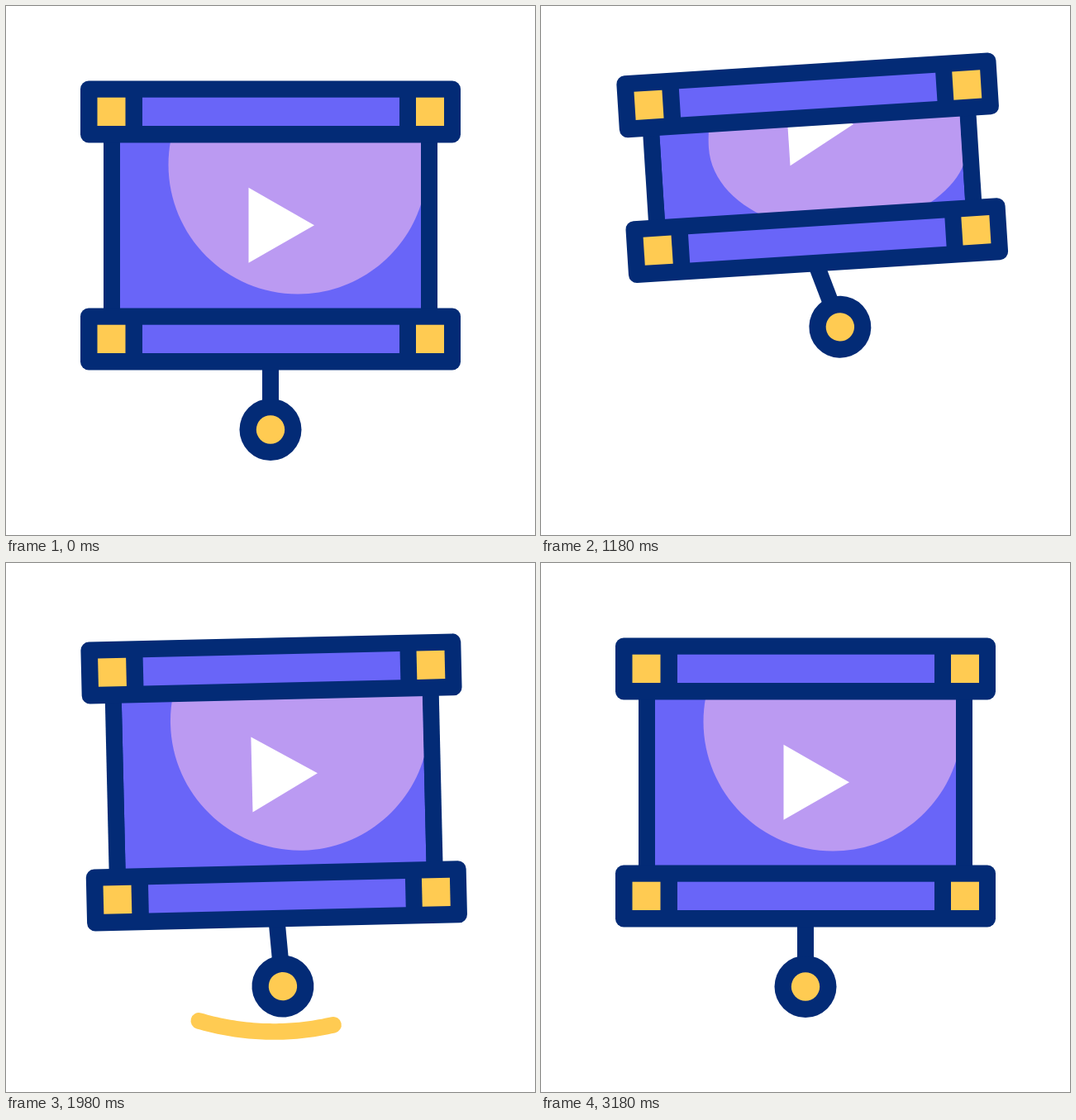
An HTML page with a canvas for the animation above (3.44 s loop, 640x640 px).

```html
<!DOCTYPE html>
<html>
<head>
<meta charset="utf-8">
<style>
html, body { margin: 0; width: 100%; height: 100%; overflow: hidden; background: #fff; }
canvas { display: block; }
</style>
</head>
<body>
<canvas id="stage" width="640" height="640"></canvas>
<script>
const ctx = document.getElementById('stage').getContext('2d');
const LOOP = 3440, REST = 275, RAD = Math.PI / 180;
const NAVY = '#032b76', VIOLET = '#6965f8', LILAC = '#bb9af2', YELLOW = '#ffcb52';

const progress = (t, from, to) => Math.min(1, Math.max(0, (t - from) / (to - from)));
const wave = (t, from, to) => (1 - Math.cos(Math.PI * progress(t, from, to))) / 2;
const easeOut = (t, from, to) => 1 - (1 - progress(t, from, to)) ** 2;
const hump = (t, from, peak, to) => wave(t, from, peak) - wave(t, peak, to);

function snap(t, from, to) {
  const p = progress(t, from, to);
  return p < 0.5 ? 4 * p ** 3 : 1 - 4 * (1 - p) ** 3;
}

// Swings from 0 at `start` to each [time, value] in turn.
function sway(t, start, ...turns) {
  let value = 0, from = start, last = 0;
  for (const [to, next] of turns) {
    value += (next - last) * wave(t, from, to);
    from = to;
    last = next;
  }
  return value;
}

function pose(t) {
  const wobble = t > 2200 && t < 3180 ? Math.sin(Math.PI * (t - 2200) / 245) : 0;
  return {
    lift: -21.5 * hump(t, 240, 600, 850) - 20.5 * hump(t, 850, 1150, 1500),
    drop: REST + 66 * wave(t, 240, 600) - 215 * snap(t, 694, 823) + 149 * wave(t, 840, 1705),
    tilt: sway(t, 240, [665, 2.4], [1078, -6.2], [1370, 3.1], [1690, -8.85], [2080, 0]),
    swing: sway(t, 240, [600, 15.5], [930, -12], [1190, 21], [1480, -12], [1830, 13], [2215, -10], [2615, 0]),
    hop: -11.5 * hump(t, 1400, 1650, 3000) + 6 * hump(t, 2700, 3000, 3180),
    twist: -5.8 * wobble
  };
}

function rect(x, y, w, h, color) {
  ctx.fillStyle = color;
  ctx.fillRect(x, y, w, h);
}

function disc(x, y, r, color) {
  ctx.fillStyle = color;
  ctx.beginPath();
  ctx.arc(x, y, r, 0, 7);
  ctx.fill();
}

function bar(y) {
  ctx.fillStyle = NAVY;
  ctx.beginPath();
  ctx.roundRect(-230, y - 37.5, 460, 75, 10);
  ctx.fill();
  rect(-155, y - 17.3, 311, 34.3, VIOLET);
  for (const x of [-209.5, 176]) rect(x, y - 17.3, 34, 34.3, YELLOW);
}

// Big circle whose lower half bends as the screen stretches.
function glow(drop) {
  const s = drop - REST, x = 33, y = 64, r = 156.5, k = 0.5523;
  const low = y + r + 0.52 * s - 0.0004 * s * s;
  const left = y + 0.16 * s + 0.0008 * s * s;
  const right = y + 0.16 * s + 0.002 * s * s;
  ctx.fillStyle = LILAC;
  ctx.beginPath();
  ctx.moveTo(x - r, left);
  ctx.bezierCurveTo(x - r, left + k * (low - left), x - k * r, low, x, low);
  ctx.bezierCurveTo(x + k * r, low, x + r, right + k * (low - right), x + r, right);
  ctx.bezierCurveTo(x + r, right - k * r, x + k * r, y - r, x, y - r);
  ctx.bezierCurveTo(x - k * r, y - r, x - r, left - k * r, x - r, left);
  ctx.fill();
}

function playMark(y, twist) {
  ctx.translate(0, y);
  ctx.rotate(twist * RAD);
  ctx.fillStyle = '#fff';
  ctx.beginPath();
  ctx.moveTo(-26.5, -45.5);
  ctx.lineTo(-26.5, 45.5);
  ctx.lineTo(53, 0);
  ctx.fill();
}

function screen({ drop, hop, twist }) {
  rect(-202, 0, 404, drop, NAVY);
  ctx.save();
  ctx.beginPath();
  ctx.rect(-182, 36, 364, drop - 72);
  ctx.clip();
  rect(-182, 0, 364, drop, VIOLET);
  glow(drop);
  playMark(drop - 137.7 + hop, twist);
  ctx.restore();
}

function pull({ drop, tilt, swing }) {
  ctx.save();
  ctx.translate(0, drop + 37.5);
  ctx.rotate(-(tilt + swing) * RAD);
  rect(-10, -8, 20, 70, NAVY);
  disc(0, 72, 37.5, NAVY);
  disc(0, 72, 17.2, YELLOW);
  ctx.restore();
}

function strokeYellow() {
  ctx.strokeStyle = YELLOW;
  ctx.lineCap = ctx.lineJoin = 'round';
  ctx.lineWidth = 19.7;
  ctx.stroke();
}

function swoosh(t) {
  const tail = wave(t, 1690, 2590), head = easeOut(t, 1640, 2380);
  if (head - tail < 0.005) return;
  ctx.beginPath();
  for (let i = 0; i <= 40; i++) {
    const u = tail + (head - tail) * i / 40;
    ctx.lineTo(152 + 344 * u, 520 + 188 * u * (1 - u));
  }
  strokeYellow();
}

// Three rays above and three below the play mark.
function burst(t) {
  const head = 24 * wave(t, 2200, 2395), tail = 24 * wave(t, 2260, 2540);
  if (head - tail < 0.5) return;
  ctx.beginPath();
  for (const side of [-1, 1]) {
    for (const column of [-1, 0, 1]) {
      const dx = 0.77 * column, dy = side * (column ? 0.63 : 1);
      const x = 325 + 80 * column, y = 262 + side * (column ? 59 : 74);
      const from = (tail - 7.2) * 1.75 - 12.5 + 12, to = (head - 23) * 1.75 + 13;
      ctx.moveTo(x + dx * from, y + dy * from);
      ctx.lineTo(x + dx * to, y + dy * to);
    }
  }
  strokeYellow();
}

function draw(t) {
  const p = pose(t);
  rect(0, 0, 640, 640, '#fff');
  ctx.save();
  ctx.translate(320, 86 + p.lift);
  ctx.rotate(p.tilt * RAD);
  ctx.translate(0, 42);
  screen(p);
  pull(p);
  bar(0);
  bar(p.drop);
  ctx.restore();
  swoosh(t);
  burst(t);
}

const start = performance.now();
function tick() {
  draw((performance.now() - start) % LOOP);
  requestAnimationFrame(tick);
}
tick();
</script>
</body>
</html>
```
